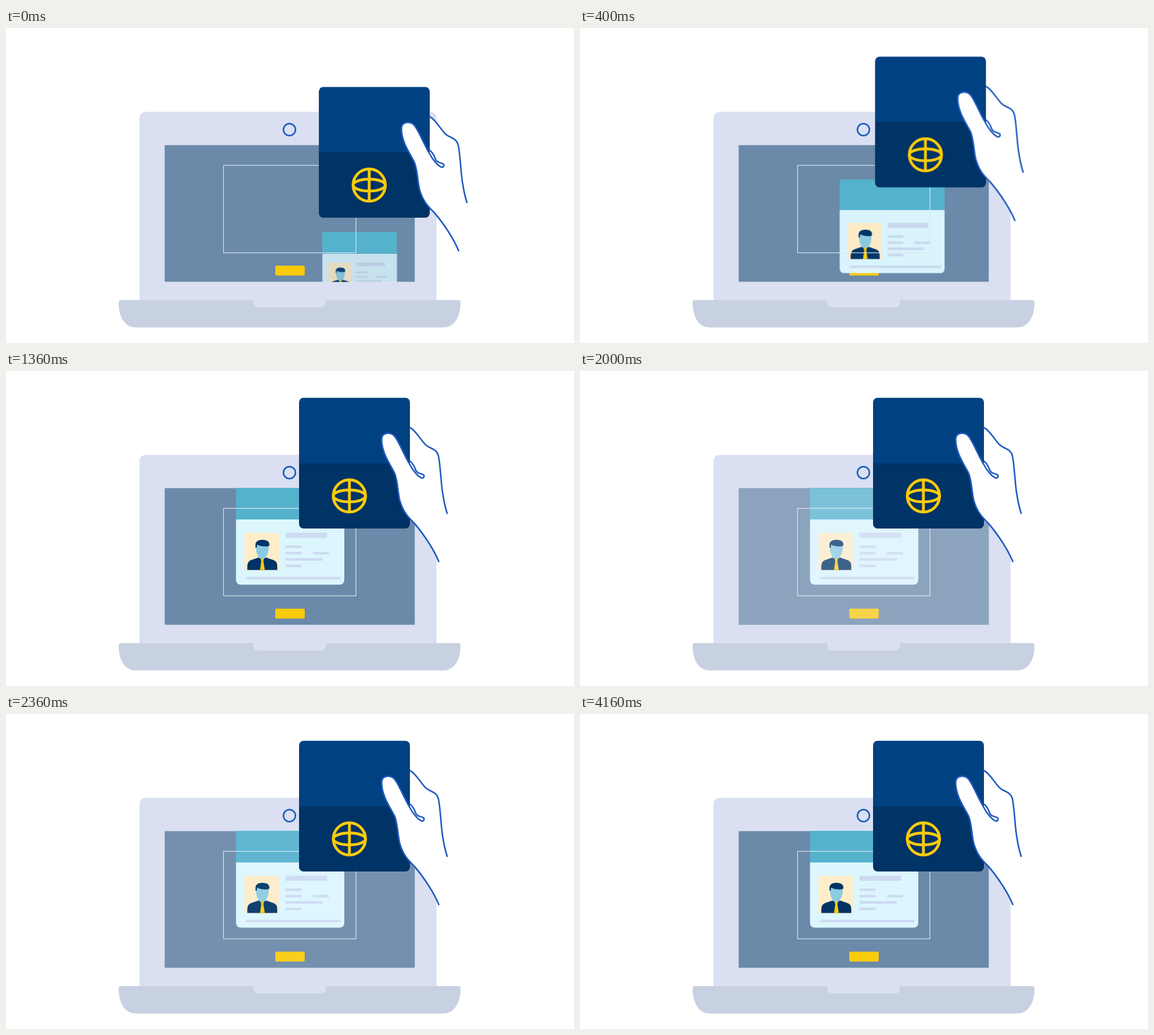
Write an HTML page that moves like this. It is 1004 px wide and 558 px high and loops after 4520 ms.

```html
<!DOCTYPE html>
<html lang="en">
<head>
<meta charset="utf-8">
<title>Document check</title>
<style>
  html, body { margin: 0; width: 100%; height: 100%; overflow: hidden; background: #fff; }
  svg { display: block; width: 100%; height: 100%; }

  .pass-x, .pass-y, .card-x, .card-y, .card, .body, .flash {
    animation: 4520ms linear infinite;
  }
  .pass-x { animation-name: pass-x; }
  .pass-y { animation-name: pass-y; }
  .card-x { animation-name: card-x; }
  .card-y { animation-name: card-y; }
  .card   { animation-name: card-grow; transform-origin: 502.25px 292.75px; }
  .body   { animation-name: body-show; }
  .flash  { animation-name: flash; }

  /* starts at 20 ms (.44 %); the passport rests at 580 ms, the card at 1060 ms */
  @keyframes pass-x {
    0%, .44% { transform: translateX(35px); animation-timing-function: cubic-bezier(.5, 1, .89, 1); }
    12.83%, 100% { transform: none; }
  }
  @keyframes pass-y {
    0%, .44% { transform: translateY(57px); animation-timing-function: cubic-bezier(.3, .8, .6, 1); }
    12.83%, 100% { transform: none; }
  }
  @keyframes card-x {
    0%, .44% { transform: translateX(122.75px); animation-timing-function: cubic-bezier(.5, 1, .89, 1); }
    23.45%, 100% { transform: none; }
  }
  @keyframes card-y {
    0%, .44% { transform: translateY(127.3px); animation-timing-function: cubic-bezier(.25, .03, .35, 1); }
    23.45%, 100% { transform: none; }
  }
  @keyframes card-grow {
    0%, .44% { transform: scale(.689); animation-timing-function: cubic-bezier(.5, 1, .89, 1); }
    12.83%, 100% { transform: none; }
  }
  @keyframes body-show {
    0%, .44% { opacity: .82; animation-timing-function: cubic-bezier(.5, 1, .89, 1); }
    12.83%, 100% { opacity: 1; }
  }
  /* 1820, 2020, 2200, 2240, 2380 ms */
  @keyframes flash {
    0%, 40.27% { opacity: 0; }
    44.69% { opacity: .28; }
    48.67% { opacity: .54; }
    49.56% { opacity: .52; }
    52.65%, 100% { opacity: 0; }
  }

  .line { fill: none; stroke: #1f5bbf; stroke-width: 2.7; stroke-linecap: round; stroke-linejoin: round; }
  .globe { fill: none; stroke: #facb0b; stroke-width: 5; }
  .lilac { fill: #dae0f2; }
  .navy { fill: #003366; }
  .gold { fill: #facb0b; }
  .text { fill: #cddaf1; }
</style>
</head>
<body>
<svg viewBox="0 0 1004 558" preserveAspectRatio="none">
  <defs>
    <clipPath id="screen"><rect x="280.5" y="207.5" width="442" height="242"/></clipPath>
    <clipPath id="cover"><rect x="518" y="47.5" width="196" height="231.5" rx="8"/></clipPath>
  </defs>

  <!-- laptop -->
  <path class="lilac" d="M236 484V161Q236 148.500 248.500 148.500H748.500Q761 148.500 761 161V484Z"/>
  <path fill="#c8d1e1" d="M203 482H799.500Q803.500 482 803.500 486C803.500 512 792 530.500 773 530.500H229C210 530.500 199 512 199 486Q199 482 203 482Z"/>
  <path class="lilac" d="M437 481.500H565.500V485Q565.500 495 556 495H446.500Q437 495 437 485Z"/>
  <circle class="line" cx="501" cy="180" r="10.600"/>

  <!-- screen -->
  <g clip-path="url(#screen)">
    <rect x="280" y="207" width="443" height="243" fill="#6b89a8"/>
    <rect class="gold" x="476" y="421" width="52" height="17.500" rx="2"/>
    <g class="card-x"><g class="card-y"><g class="card">
      <rect x="406.500" y="207" width="191.500" height="56" fill="#55b2cd"/>
      <g class="body">
        <path fill="#dcf6fe" d="M406.500 263H598V369.500Q598 378.500 589 378.500H415.500Q406.500 378.500 406.500 369.500Z"/>
        <rect x="421.500" y="286.500" width="61" height="66.500" fill="#feedc8"/>
        <path fill="#8ccbe2" d="M442 306H464.500C465 318 463 325 460 327.500V332L453 336L446 332V327.500C443 325 441.500 318 442 306Z"/>
        <path class="navy" d="M441 313V307Q442 299 453 299Q466.500 299 465.500 309L463 310.500Q451 311.500 444 307.500L443 313Z"/>
        <path class="navy" d="M426.500 352.500V346Q427 337 433 335L446 330.500L453 334L460 330.500L473 335Q479.500 337 479.500 346V352.500Z"/>
        <path class="gold" d="M450 332H456L455 337L457.500 352.500H449L451.200 337Z"/>
        <g class="text">
          <rect x="494" y="286.500" width="73.500" height="9"/>
          <rect x="494" y="309" width="28.500" height="4.500"/>
          <rect x="494" y="320.500" width="28.500" height="4.500"/>
          <rect x="542.500" y="320.500" width="28.500" height="4.500"/>
          <rect x="494" y="331.500" width="66" height="4.500"/>
          <rect x="494" y="343" width="28.500" height="4.500"/>
          <rect x="424.500" y="364.700" width="167" height="4.300"/>
        </g>
      </g>
    </g></g></g>
    <rect x="384.500" y="243.300" width="234" height="155" fill="none" stroke="#dbe7f2" stroke-width="1.200"/>
    <rect class="flash" x="280" y="207" width="443" height="243" fill="#ebeefa"/>
  </g>

  <!-- passport and hand -->
  <g class="pass-x"><g class="pass-y">
    <g clip-path="url(#cover)">
      <rect x="518" y="47" width="196" height="117" fill="#004182"/>
      <rect class="navy" x="518" y="163.500" width="196" height="116"/>
    </g>
    <circle class="globe" cx="607" cy="221.300" r="28.500"/>
    <ellipse class="globe" cx="607" cy="221.300" rx="28.500" ry="10.500"/>
    <path class="globe" d="M607 193V250"/>
    <path fill="#fff" d="M714 100C724 105 733 122 742 131C750 138 760 137 764 149C768 164 769 205 772.500 220C774 232 777 243 780 253L765.500 338C757 318 740 291 722 270C711 259 702 250 696 229C692 213 693 197 687 181C679 165 664 145 664 121C664 108 681 107 688 117C697 130 704 150 714 166Z"/>
    <path class="line" d="M714.500 100.500C724 105 733 122 742 131C750 138 760 137 764 149C768 164 769 205 772.500 220C774 232 777 243 779.700 252"/>
    <path class="line" d="M765 337.500C757 318 740 291 722 270C711 259 702 250 696 229C692 213 693 197 687 181C679 165 664 145 664 121C664 108 681 107 688 117C697 130 704 150 714 166C719 176 727 185 732 188C737 192 741 187 738 184C735 181 729 183 725 177C722 171 721 165 714.500 160"/>
  </g></g>
</svg>
</body>
</html>
```
